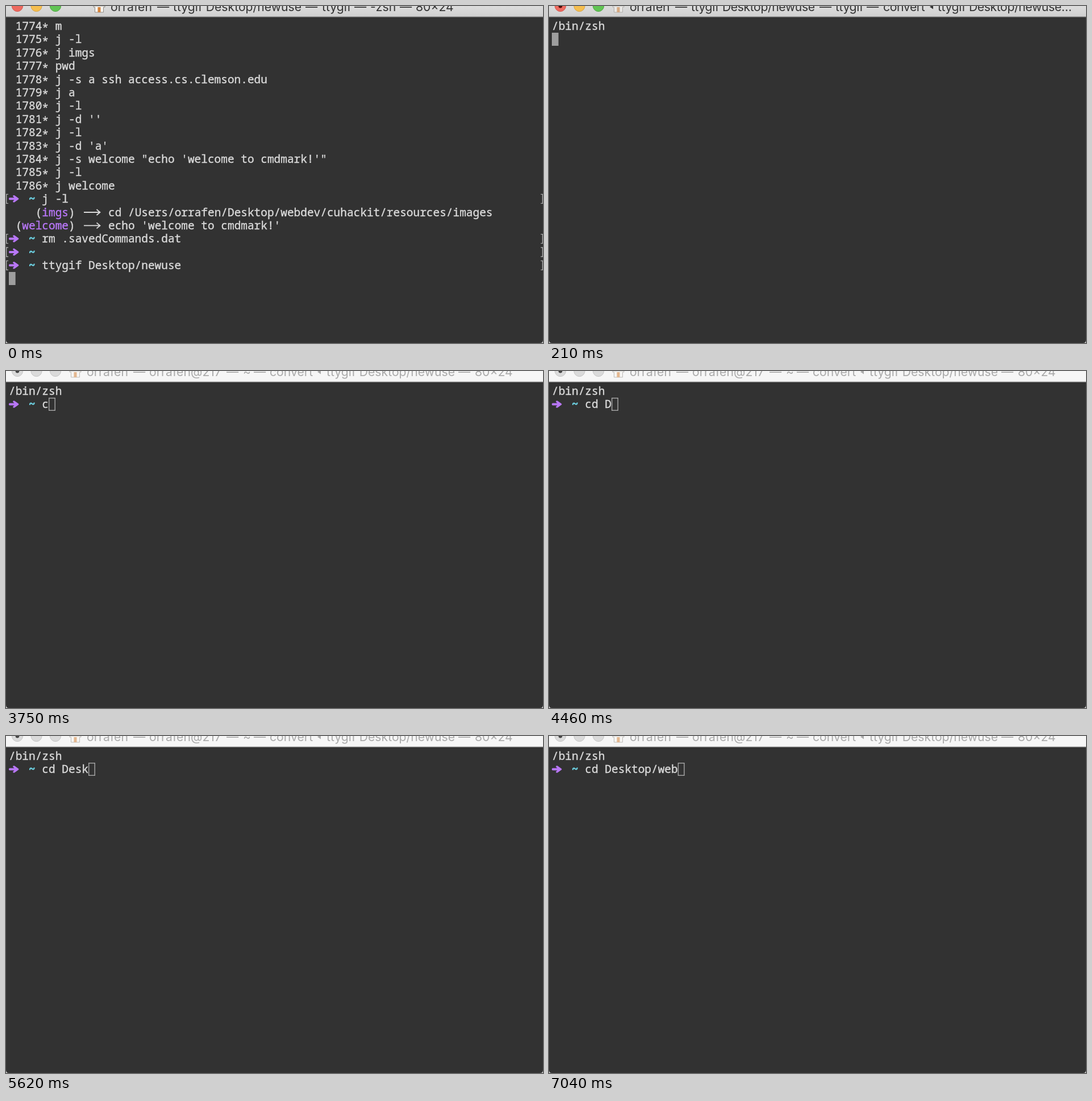
Write an HTML page that moves like this. It is 945x593 px and loops after 8 s.

```html
<!DOCTYPE html>
<html lang="en">
<head>
<meta charset="utf-8">
<title>Terminal session</title>
<style>
  html, body { margin: 0; width: 100%; height: 100%; overflow: hidden; background: #323232; }
  svg { display: block; width: 945px; height: 593px; }
  text { white-space: pre; }
  #screen text {
    font: 500 19.45px "Noto Sans Mono", "DejaVu Sans Mono", monospace;
    fill: #dadada; stroke: #dadada; stroke-width: .4px;
  }
  #screen .name { fill: #b877f8; stroke: #b877f8; }
  #screen .tilde { fill: #6ccfe0; stroke: #6ccfe0; stroke-width: 1.1px; }
  #screen .slash { font-weight: 700; }
  #bar text { font: 400 21.2px Inter, "Liberation Sans", sans-serif; }
</style>
</head>
<body>
<svg viewBox="0 0 945 593">
  <defs>
    <linearGradient id="metal" x1="0" y1="0" x2="0" y2="1">
      <stop offset="0" stop-color="#dcdcdc"/>
      <stop offset="1" stop-color="#d0d0d0"/>
    </linearGradient>
  </defs>
  <rect width="945" height="593" fill="#323232"/>
  <path d="M0 588Q0 593 5 593H0ZM945 588Q945 593 940 593H945Z" fill="#d8d8d8"/>
  <g id="bar"></g>
  <g id="screen"></g>
</svg>
<script>
const LOOP = 8000, LEFT = 5, TOP = 23.7, COL = 11.67, ROW = 23.4;
const USER = "orrafen";
const bar = document.getElementById("bar");
const screen = document.getElementById("screen");

const colX = c => LEFT + c * COL;
const rowY = r => TOP + r * ROW;
const esc = s => s.replace(/&/g, "&amp;").replace(/</g, "&lt;");

const history = [
  "m", "j -l", "j imgs", "pwd", "j -s a ssh access.cs.clemson.edu", "j a", "j -l",
  "j -d ''", "j -l", "j -d 'a'", "j -s welcome \"echo 'welcome to cmdmark!'\"",
  "j -l", "j welcome"
];

// start time and what has been typed by then
const typing = [
  [340, ""], [3750, "c"], [3870, "cd"], [4190, "cd "], [4460, "cd D"],
  [4880, "cd De"], [5000, "cd Des"], [5620, "cd Desk"], [6480, "cd Desktop/"],
  [6620, "cd Desktop/w"], [6850, "cd Desktop/we"], [7040, "cd Desktop/web"]
];

const titles = {
  idle: {
    icon: 154,
    words: [[184, USER], [266, "—"], [294, "ttygif Desktop/newuse"], [527, "—"],
      [556, "ttygif"], [613, "—"], [641, "-zsh"], [693, "—"], [721, "80×24"]]
  },
  start: {
    icon: 112, mark: 670, spacing: -0.4,
    words: [[142, USER], [222, "—"], [250, "ttygif Desktop/newuse"], [476, "—"],
      [504, "ttygif"], [559, "—"], [588, "convert"], [684, "ttygif Desktop/newuse…"]]
  },
  shell: {
    icon: 112, mark: 548,
    words: [[142, USER], [224, "—"], [252, USER + "@217"], [388, "—"], [417, "~"],
      [436, "—"], [464, "convert"], [564, "ttygif Desktop/newuse"], [796, "—"], [825, "80×24"]]
  }
};

function put(r, c, s, cls = "", dy = 0) {
  return `<text x="${colX(c)}" y="${rowY(r) + 18.2 + dy}" class="${cls}">${esc(s)}</text>`;
}

function prompt(r, command) {
  return `<path transform="translate(5 ${rowY(r) + 11.4})" fill="#b877f8"
    d="M1.5-2H9.5L7-4.6Q7.5-7 10-6L17 -1Q18 0 17 1L10 6Q7.5 7 7 4.6L9.5 2H1.5Q0 2 0 0T1.5-2Z"/>`
    + put(r, 3, "~", "tilde") + put(r, 5, command);
}

function brackets(r) {
  const y = rowY(r) + 3.5;
  return `<path d="M4 ${y}H.7v16H4M941 ${y}h3.3v16H941" fill="none" stroke="#a5a5a5" stroke-width="1.4"/>`;
}

function saved(r, c, name, command) {
  const y = rowY(r) + 11.7;
  return put(r, c, "(") + put(r, c + 1, name, "name") + put(r, 9, ")")
    + `<path d="M137 ${y}H165M159.5 ${y - 5}L165.5 ${y}L159.5 ${y + 5}" fill="none" stroke="#dadada" stroke-width="1.8"/>`
    + put(r, 15, command);
}

function cursor(r, c, hollow) {
  const y = Math.round(rowY(r));
  return hollow
    ? `<rect x="${colX(c) + .7}" y="${y + .7}" width="10.5" height="21.6" fill="none" stroke="#a8a8a8" stroke-width="1.4"/>`
    : `<rect x="${colX(c)}" y="${y}" width="${COL}" height="23" fill="#9e9e9e"/>`;
}

function log() {
  const lines = history.map((cmd, r) =>
    put(r, 1, String(1774 + r)) + put(r, 5, "*", "", 3.5) + put(r, 7, cmd));
  return lines.join("")
    + [13, 16, 17, 18].map(brackets).join("")
    + prompt(13, "j -l")
    + saved(14, 4, "imgs", `cd /Users/${USER}/Desktop/webdev/cuhackit/resources/images`)
    + saved(15, 1, "welcome", "echo 'welcome to cmdmark!'")
    + prompt(16, "rm .savedCommands.dat") + prompt(17, "") + prompt(18, "ttygif Desktop/newuse")
    + cursor(19, 0);
}

function titleBar(name, active) {
  const { icon, words, mark, spacing = 0 } = titles[name];
  const ink = active ? "#333" : "#aaa";
  const lights = active ? ["#ee6a5f", "#f5be4f", "#61c454"] : ["#dadada", "#dadada", "#dadada"];
  const rims = active ? ["#d5524a", "#d9a13c", "#4aa73d"] : ["#c4c4c4", "#c4c4c4", "#c4c4c4"];
  let out = `<rect width="945" height="19" fill="${active ? "url(#metal)" : "#f6f6f6"}"/>
    <rect y="18" width="945" height="1.5" fill="${active ? "#a6a6a6" : "#cfcfcf"}"/>`;
  lights.forEach((fill, i) => {
    out += `<circle cx="${20 + i * 33.5}" cy="0" r="9.6" fill="${fill}" stroke="${rims[i]}"/>`;
  });
  if (name !== "idle") out += `<circle cx="20" cy="0" r="3.4" fill="${active ? "#4d0902" : "#444"}"/>`;
  out += `<g transform="translate(${icon} 0)" opacity="${name === "idle" ? 1 : .55}">
    <path d="M0 0H20V2H17.5V11H2.5V2H0Z" fill="#f7f5f1" stroke="#8f8b86"/>
    <rect x="7.5" y="2" width="5" height="9" fill="#d5843c"/></g>`;
  words.forEach(([x, s]) => {
    out += `<text x="${x}" y="8.7" fill="${ink}" letter-spacing="${spacing}">${s}</text>`;
  });
  if (mark) out += `<path d="M${mark} 1.5l6-4v8z" fill="${ink}"/>`;
  return out;
}

function session(t) {
  if (t < 210) return cursor(0, 0);
  const head = put(0, 0, "/bin/zsh");
  if (t < 270) return head + cursor(1, 0);
  const step = typing.filter(([start]) => t >= start).pop();
  const typed = step ? step[1] : "";
  // the completed slash stays bold until the next key
  const bold = typed.endsWith("/");
  return head + prompt(1, bold ? typed.slice(0, -1) : typed)
    + (bold ? put(1, 4 + typed.length, "/", "slash") : "")
    + cursor(1, 5 + typed.length, t >= 3750);
}

const shown = new Map();
function update(node, html) {
  if (shown.get(node) === html) return;
  shown.set(node, html);
  node.innerHTML = html;
}

function draw(now) {
  const t = now % LOOP;
  const name = t < 110 ? "idle" : t < 340 ? "start" : "shell";
  update(bar, titleBar(name, t < 3750));
  update(screen, t < 110 ? log() : session(t));
}

const begin = performance.now();
function tick() {
  draw(performance.now() - begin);
  requestAnimationFrame(tick);
}
tick();
</script>
</body>
</html>
```
